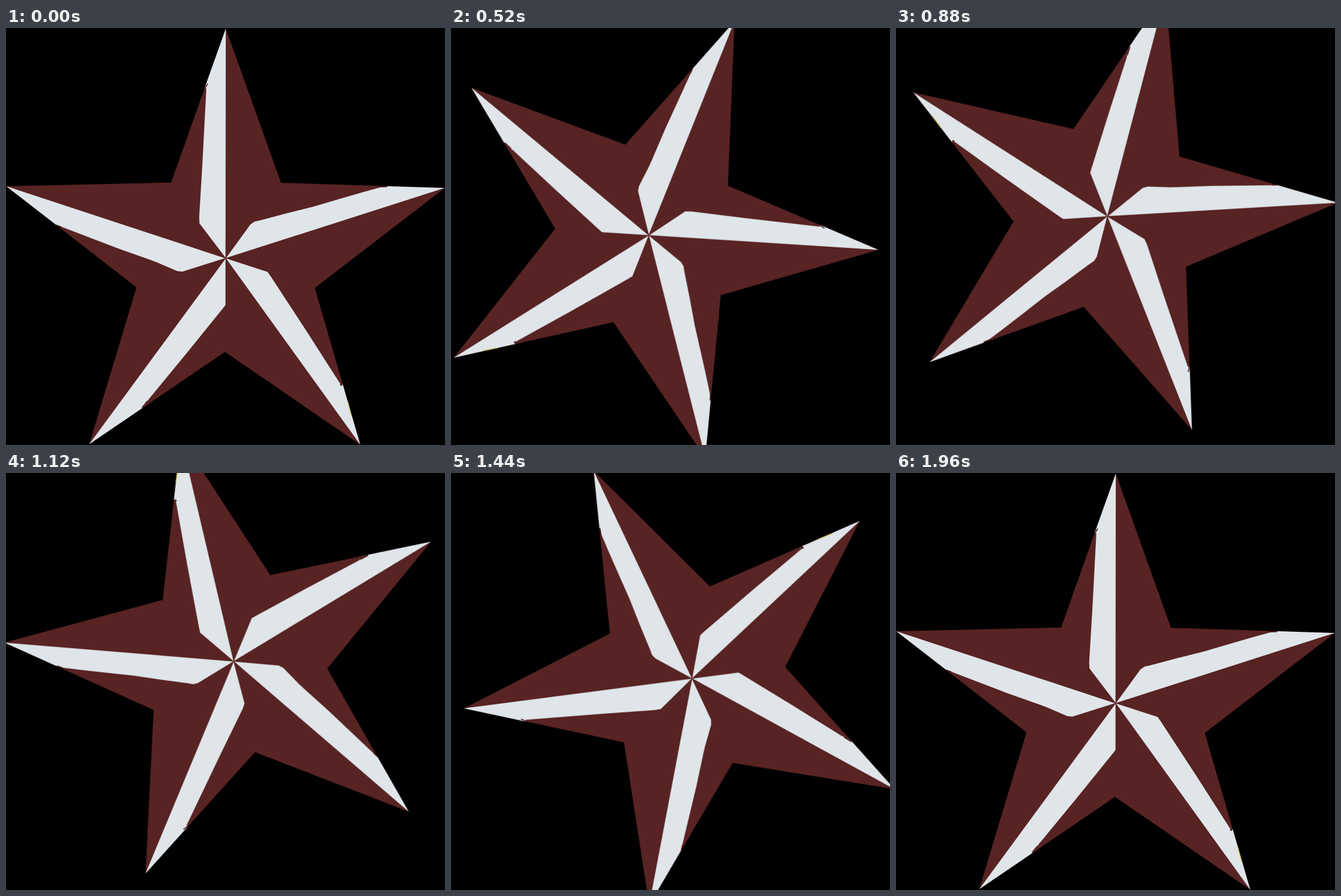
Write an HTML page that moves like this. It is 767 px wide and 730 px high and loops after 2000 ms.

```html
<!DOCTYPE html>
<html lang="en">
<head>
<meta charset="utf-8">
<title>Spinning star</title>
<style>
  html, body { margin: 0; width: 100%; height: 100%; overflow: hidden; background: #000; }
  svg { display: block; width: 767px; height: 730px; }
  .star { transform-origin: 383.5px 365px; animation: spin 2s infinite; }
  .body { fill: #582323; }
  .facets { fill: #dfe5e9; }
  .ticks { fill: none; stroke: #43100e; stroke-width: 1.6; stroke-linecap: round; }
  .glint { fill: none; stroke: #cdbb45; stroke-width: 1.4; }

  /* 40 ms steps; the second half turn is one step shorter, then rests */
  @keyframes spin {
    0%   { transform: rotate(0deg);   animation-timing-function: steps(25, end); }
    50%  { transform: rotate(180deg); animation-timing-function: steps(24, end); }
    98%  { transform: rotate(360deg); }
    100% { transform: rotate(360deg); }
  }
</style>
</head>
<body>
<svg viewBox="0 0 767 730">
  <g class="star">
    <path class="body" d="M384 1L480.500 271L766.500 280L539.500 455L619 729.500L382.500 567L145.500 728.500L228 454L0.500 277L288.500 270.500Z"/>
    <g class="facets">
      <path d="M384 1L383.500 402L338 342L337.500 331L343 240L350 106L347 105Z"/>
      <path d="M766.500 280L384.500 402.500L427 344L434 339L445 336.500L490 324.500L536 313L587 298L625 287L654 279L668 277Z"/>
      <path d="M619 729.500L384.500 403.500L457 427L462 434L524 529L586 626L588.400 624Z"/>
      <path d="M145.500 728.500L383.500 404L383.500 485L378 492L315 570L250 649L247 654L238 665.500Z"/>
      <path d="M0.500 277L382.500 403L308 426.500L299 425.500L262 409.500L196 386L97 348L90 346.600Z"/>
    </g>
    <path class="ticks" d="M352 98L348 105M653 278H665M584 624L586 626M238 664L247 653M88 345L96 348"/>
    <path class="glint" d="M597 654L603.500 679"/>
  </g>
</svg>
</body>
</html>
```
